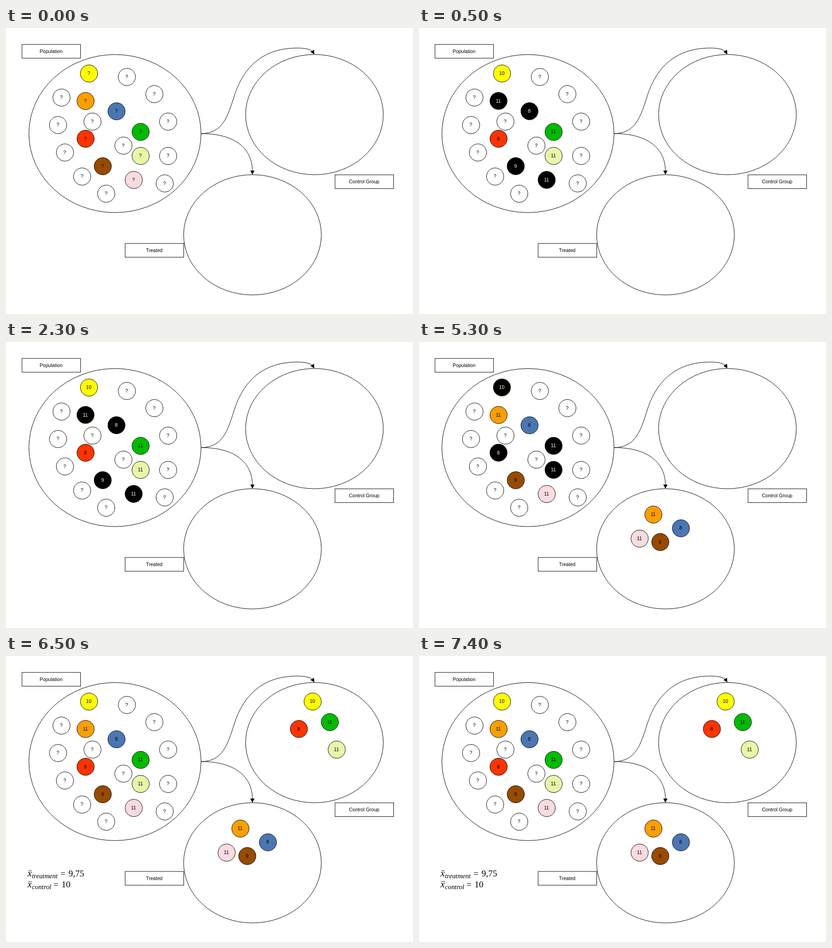
An HTML page for the animation above (8000 ms loop, 892 px wide and 628 px high).

```html
<!DOCTYPE html>
<html lang="en">
<head>
<meta charset="utf-8">
<title>Random assignment</title>
<style>
  html, body { margin: 0; width: 100%; height: 100%; overflow: hidden; background: #fff; }
  svg { display: block; }
  .line { fill: none; stroke: #000; }
  .label { font: 10.6px "Liberation Sans", Arial, sans-serif; text-anchor: middle; }
  .math { font: 19.5px "Liberation Serif", "Times New Roman", serif; }
  .var { font-size: 20.5px; font-style: italic; }
  .sub { font-size: 14.8px; font-style: italic; }
</style>
</head>
<body>
<svg id="stage" width="892" height="628" viewBox="0 0 892 628">
  <g class="line">
    <ellipse cx="238.8" cy="231.8" rx="188.6" ry="173.5"/>
    <ellipse cx="676" cy="190.2" rx="150.9" ry="132"/>
    <ellipse cx="540.2" cy="454.2" rx="150.9" ry="132"/>
    <path d="M427.5 231.8C475 231.8 486 194 500 150C511 116 540 44 638 44C655 44 666 46.500 671 51"/>
    <path d="M427.5 231.8C502 231.8 540 265 540 314"/>
  </g>
  <path d="M675.8 58L667.3 52.500L675 47.800ZM540 322.200L535.400 313H544.600Z"/>
</svg>
<script>
const LOOP = 8000, ASK = 500, TREAT = 3500, CONTROL = 6500;
const STEP = 7.54, X0 = 1, Y0 = 1.95, R = 18.9;
const stage = document.getElementById("stage");

function add(parent, tag, attrs, text) {
  const el = document.createElementNS("http://www.w3.org/2000/svg", tag);
  for (const key in attrs) el.setAttribute(key, attrs[key]);
  if (text !== undefined) el.textContent = text;
  parent.appendChild(el);
  return el;
}

function label(parent, x, y, text) {
  return add(parent, "text", { class: "label", x, y, fill: "#000" }, text);
}

function box(x, y, text) {
  add(stage, "rect", { class: "line", x, y, width: 128.4, height: 30.2 });
  label(stage, x + 63.8, y + 18.5, text);
}

// Positions are given in grid steps.
function ball(parent, col, row, fill, text) {
  const x = X0 + col * STEP, y = Y0 + row * STEP;
  const rim = add(parent, "circle", { cx: x, cy: y, r: R, fill, stroke: "#000" });
  const core = add(parent, "circle", { cx: x - 0.4, cy: y - 0.4, r: R, visibility: "hidden" });
  return { rim, core, text: label(parent, x - 0.5, y + 3.3, text) };
}

box(35, 36.1, "Population");
box(721.1, 322.4, "Control Group");
box(261.1, 473.1, "Treated");

const unknown = [
  [35, 14], [16, 20], [43, 19], [15, 28], [25, 27], [47, 27], [17, 36],
  [34, 34], [47, 37], [22, 43], [46, 45], [29, 48]
];
for (const [col, row] of unknown) ball(stage, col, row, "#fff", "?");

// column, row, colour, value, group, column and row in the group
const sample = [
  [24, 13, "#ffff00", 10, "control", 89, 13],
  [23, 21, "#fa9f00", 11, "treated", 68, 50],
  [32, 24, "#4a76b2", 8, "treated", 76, 54],
  [39, 30, "#00bb00", 11, "control", 94, 19],
  [23, 32, "#fc3400", 8, "control", 85, 21],
  [39, 37, "#e9f5a9", 11, "control", 96, 27],
  [28, 40, "#964b00", 9, "treated", 70, 58],
  [37, 44, "#f9dbe0", 11, "treated", 64, 57]
];
const groups = { treated: add(stage, "g", {}), control: add(stage, "g", {}) };
const picks = sample.map(([col, row, fill, value, group, gCol, gRow]) => {
  ball(groups[group], gCol, gRow, fill, value);
  return { ...ball(stage, col, row, fill, "?"), value, group };
});

const means = add(stage, "g", { class: "math" });
function mean(y, name, eqX, value) {
  add(means, "text", { class: "var", x: 47.3, y }, "x");
  add(means, "path", { class: "line", d: `M49.5 ${y - 12.5}h6.500` });
  add(means, "text", { class: "sub", x: 57, y: y + 4.3 }, name);
  add(means, "text", { x: eqX, y }, "=");
  add(means, "text", { x: eqX + 17.8, y }, value);
}
mean(484, "treatment", 119.3, "9,75");
mean(508, "control", 104, "10");

function show(el, on) {
  el.setAttribute("visibility", on ? "visible" : "hidden");
}

function draw(t) {
  const chosen = t < ASK ? "" : t < TREAT ? "treated" : t < CONTROL ? "control" : "";
  for (const p of picks) {
    const dark = p.group === chosen;
    show(p.core, dark);
    p.rim.setAttribute("stroke", dark ? "#2e201c" : "#000");
    p.text.setAttribute("fill", dark ? "#fff" : "#000");
    p.text.textContent = t < ASK ? "?" : p.value;
  }
  show(groups.treated, t >= TREAT);
  show(groups.control, t >= CONTROL);
  show(means, t >= CONTROL);
}

const start = performance.now();
function tick() {
  draw((performance.now() - start) % LOOP);
  requestAnimationFrame(tick);
}
tick();
</script>
</body>
</html>
```
